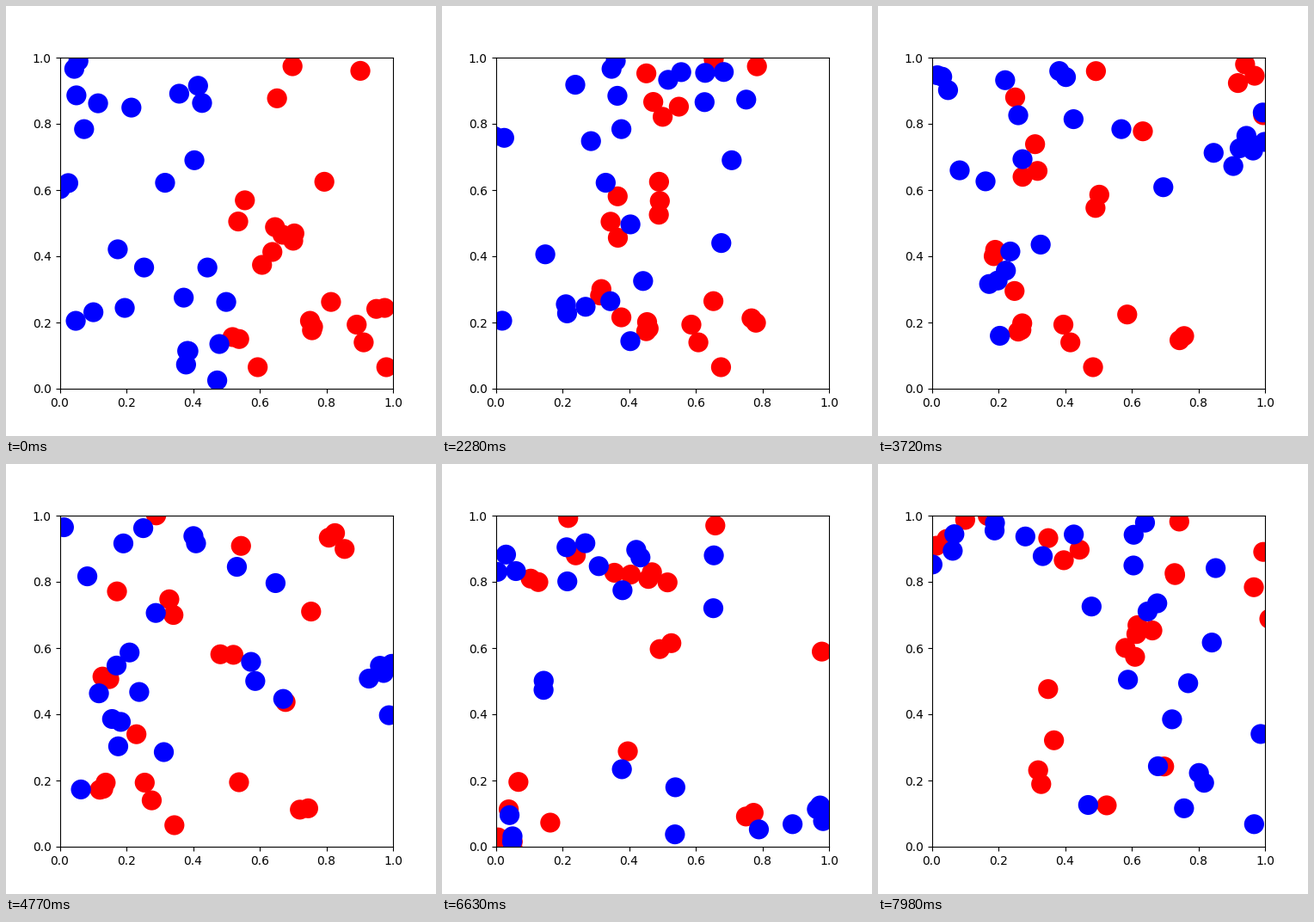
A matplotlib script that plays this animation: 500x500 px, repeating every 8000 ms.

```python
import numpy as np
import matplotlib.pyplot as plt
from matplotlib.animation import FuncAnimation
from matplotlib.collections import EllipseCollection

LOOP, TICK, STEP = 8000, 20, 30     # ms
DIAMETER = 0.06
SPEED = 0.004                       # axis units per step

# Start positions as x, y pairs; blue moves right, red moves left.
BLUE = np.reshape([
    .056, .990, .0436, .966, .050, .886, .115, .862, .215, .849,
    .073, .784, .0255, .621, .0015, .603, .174, .421, .253, .366,
    .048, .205, .101, .231, .195, .244, .316, .622, .404, .690,
    .3585, .891, .415, .915, .427, .863, .443, .366, .372, .275,
    .4995, .262, .3825, .114, .386, .1135, .379, .073, .479, .135,
    .4725, .025], (-1, 2))
RED = np.reshape([
    .6985, .974, .902, .960, .652, .877, .794, .625, .5555, .569,
    .5355, .505, .646, .488, .6685, .465, .704, .469, .7005, .447,
    .638, .413, .607, .374, .814, .262, .950, .241, .975, .244,
    .891, .1935, .751, .205, .760, .187, .757, .1765, .912, .140,
    .980, .065, .594, .065, .5185, .156, .5385, .150], (-1, 2))
N_BLUE = len(BLUE)


def collide(pos, vel, first, second):
    """Elastic hits between touching discs; the last pair sets a disc's speed."""
    gap = pos[first] - pos[second]
    dist2 = (gap ** 2).sum(axis=1)
    hit = dist2 < DIAMETER ** 2
    a, b, gap = first[hit], second[hit], gap[hit]
    along = ((vel[a] - vel[b]) * gap).sum(axis=1) / dist2[hit]
    kick = along[:, None] * gap
    new_a, new_b = vel[a] - kick, vel[b] + kick
    for k, v in list(zip(a, new_a)) + list(zip(b, new_b)):
        vel[k] = v


def simulate(steps):
    pos = np.vstack([BLUE, RED])
    vel = np.zeros_like(pos)
    vel[:N_BLUE, 0] = SPEED
    vel[N_BLUE:, 0] = -SPEED
    first, second = np.triu_indices(len(pos), 1)
    track = [pos]
    for _ in range(steps - 1):
        collide(pos, vel, first, second)
        vel = np.where(pos > 1, -abs(vel), vel)
        vel = np.where(pos < 0, abs(vel), vel)
        pos = pos + vel
        track.append(pos)
    return track


track = simulate(-(-LOOP // STEP))

fig, ax = plt.subplots(figsize=(5, 5), dpi=100)
ax.set_xlim(0, 1)
ax.set_ylim(0, 1)


def add_discs(points, color):
    size = np.full(len(points), DIAMETER)
    discs = EllipseCollection(size, size, np.zeros(len(points)), units="xy",
                              offsets=points, offset_transform=ax.transData,
                              facecolors=color, linewidths=0)
    ax.add_collection(discs, autolim=False)
    return discs


red = add_discs(RED, "red")
blue = add_discs(BLUE, "blue")


def draw(frame):
    # Sample mid-tick so each step begins at its nearest tick.
    pos = track[(frame * TICK + TICK // 2) // STEP]
    blue.set_offsets(pos[:N_BLUE])
    red.set_offsets(pos[N_BLUE:])
    return red, blue


def reset():
    return draw(0)


anim = FuncAnimation(fig, draw, frames=LOOP // TICK, init_func=reset,
                     interval=TICK, repeat=True, repeat_delay=0)
plt.show()
```
